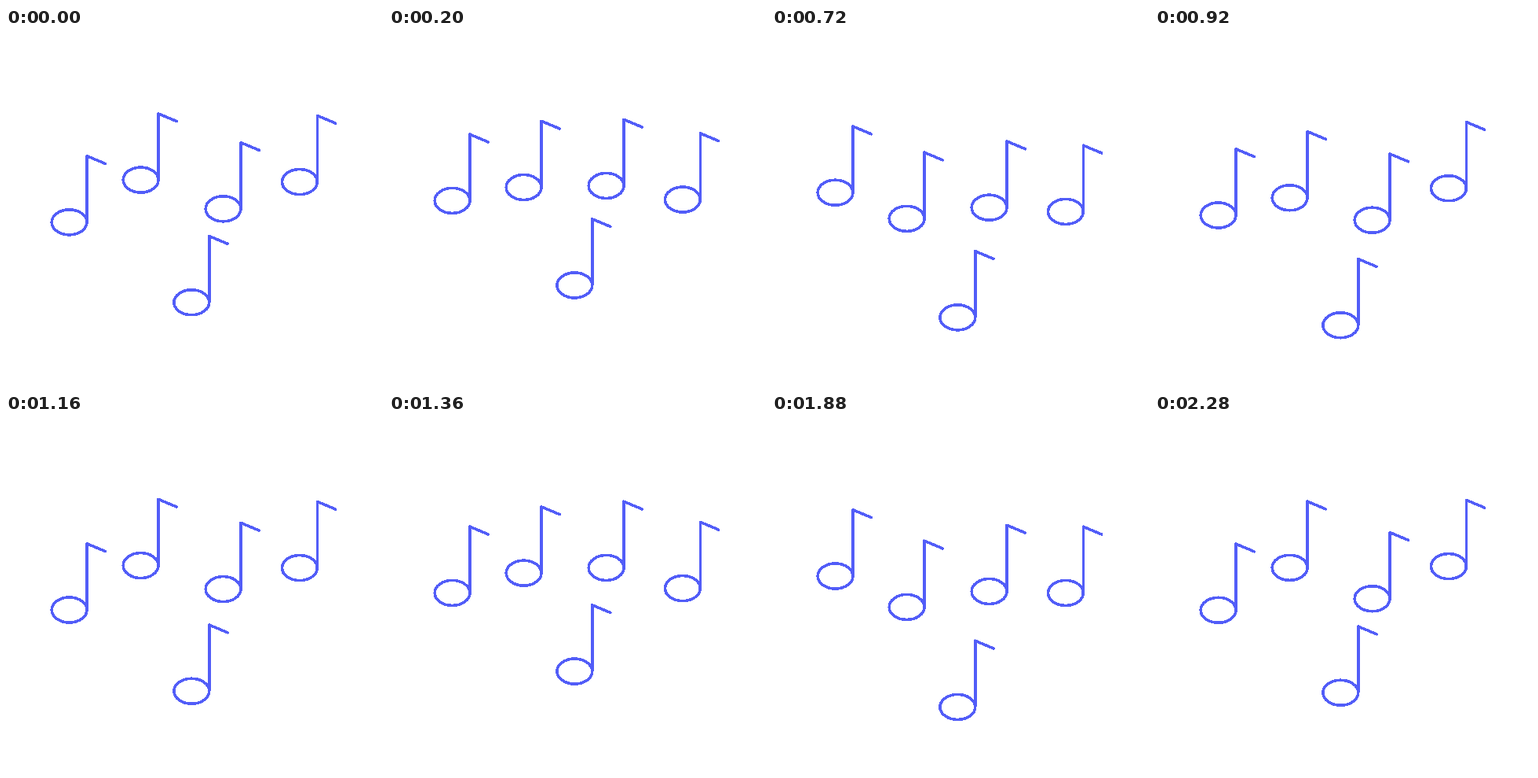
An HTML page that plays this animation: 480x455 px, repeating every 2320 ms.

```html
<!DOCTYPE html>
<html lang="en">
<head>
<meta charset="utf-8">
<title>Bobbing notes</title>
<style>
  html, body { margin: 0; width: 100%; height: 100%; overflow: hidden; background: #fff; }
  svg { display: block; width: 100%; height: 100%; }
  path {
    fill: none; stroke: #525df8; stroke-width: 3.6;
    stroke-linecap: round; stroke-linejoin: round; shape-rendering: crispEdges;
  }
</style>
</head>
<body>
<svg viewBox="0 0 480 455"></svg>
<script>
const LOOP = 2320, STEP = 40;

// low: time of the lowest point; sway: how far the timing drifts (degrees), most at time `peak`
const notes = [
  { x: 103, mid: 136, swing: 30, low: -70, sway: 8, peak: 300 },
  { x: 194, mid: 136, swing: 28, low: 618, sway: 6, peak: 750 },
  { x: 299, mid: 132, swing: 28, low: -222, sway: 8, peak: 1160 },
  { x: 396.3, mid: 136.5, swing: 28, low: 496, sway: 7, peak: 1740 },
  { x: 258.7, mid: 267, swing: 27, low: 865, sway: 7, peak: 1950 }
];

const turn = t => 2 * Math.PI * t / LOOP;

// Two bobs per loop, one a little quicker than the other
function height({ mid, swing, low, sway, peak }, t) {
  const drift = sway * Math.PI / 180 * Math.cos(turn(t - peak));
  return mid + swing * Math.cos(2 * turn(t - low) + drift);
}

const svg = document.querySelector("svg");
for (const n of notes) {
  n.el = document.createElementNS(svg.namespaceURI, "path");
  n.el.setAttribute("d", "M23.3 9.7 L0 0 V84.2 a22.4 16 0 1 1 -44.8 0 a22.4 16 0 1 1 44.8 0");
  svg.append(n.el);
}

function draw() {
  const t = Math.floor(performance.now() % LOOP / STEP) * STEP;
  for (const n of notes) n.el.setAttribute("transform", `translate(${n.x} ${height(n, t).toFixed(2)})`);
  requestAnimationFrame(draw);
}
draw();
</script>
</body>
</html>
```
